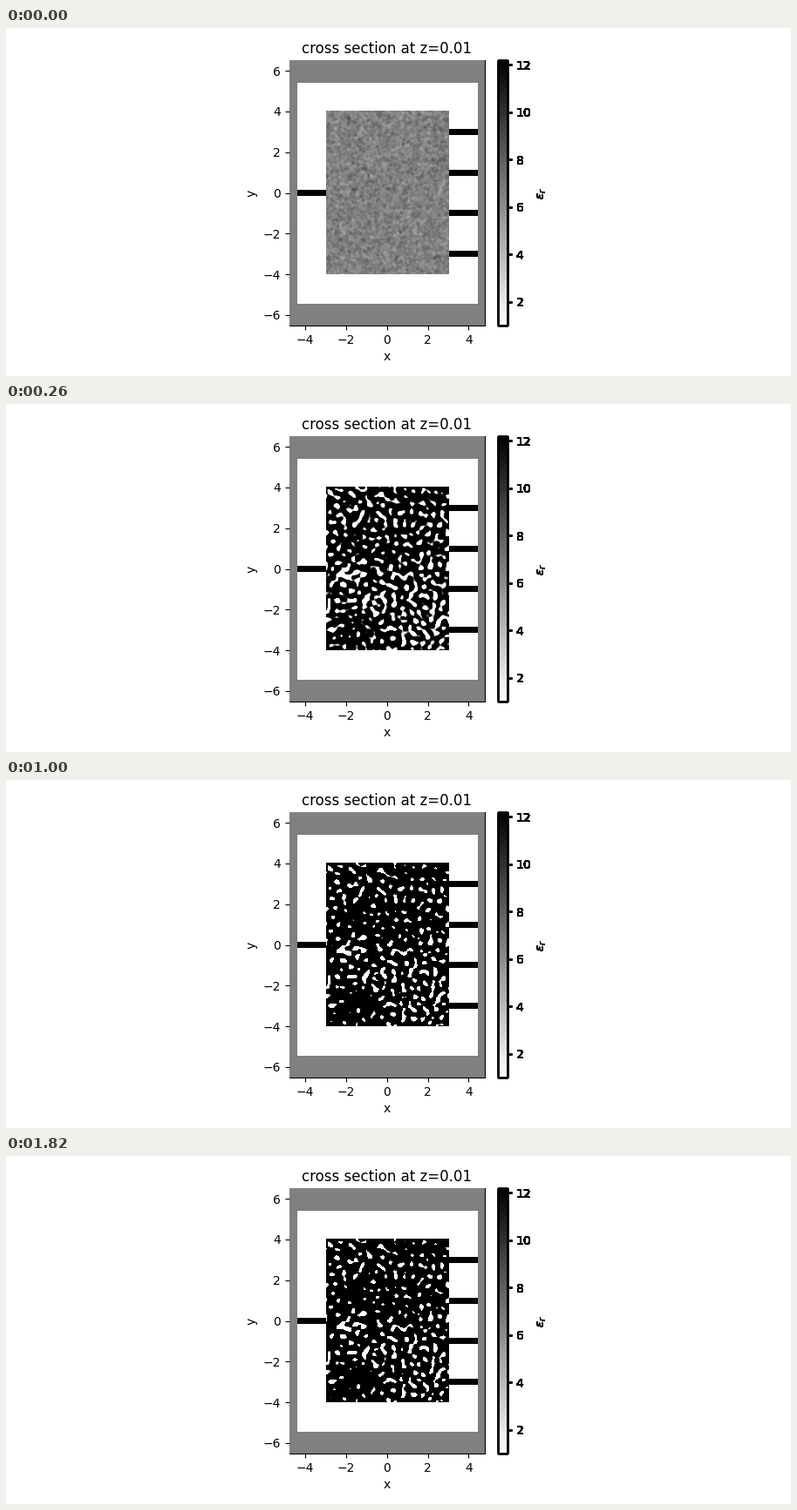
A matplotlib script that plays this animation: 900 px wide and 400 px high, repeating every 1840 ms.

```python
import matplotlib.pyplot as plt
import numpy as np
from matplotlib.animation import FuncAnimation
from matplotlib.patches import Rectangle

W, H, DPI = 900, 400, 100
TICKS, TICK_MS = 92, 20
NX, NY = 140, 187
EPS_MAX = 12.18
X_LIM, Y_LIM = 4.79, 6.511
BAR_COPIES = 40

rng = np.random.default_rng(7)
cols, rows = np.meshgrid(np.arange(NX), np.arange(NY))


def filtered(gain):
    """White noise shaped by a spectral gain, scaled to unit deviation."""
    fy = np.fft.fftfreq(NY)[:, None]
    fx = np.fft.fftfreq(NX)[None, :]
    spec = np.fft.fft2(rng.standard_normal((NY, NX))) * gain(fx, fy)
    out = np.fft.ifft2(spec).real
    return (out - out.mean()) / out.std()


def band(center, width):
    return lambda fx, fy: np.exp(-((np.hypot(fx, fy) - center) / width) ** 2)


def bump(x, y, rx, ry):
    return np.exp(-((cols - x) / rx) ** 2 - ((rows - y) / ry) ** 2)


grain = filtered(lambda fx, fy: np.exp(-(fx**2 + fy**2) * 24))
ripple = filtered(band(0.14, 0.03))
blobs = filtered(band(0.09, 0.045))

# more void along the middle and lower right, more solid elsewhere
trend = (1.5 * bump(22, 100, 18, 6) + 0.9 * bump(48, 131, 22, 8)
         + 0.5 * bump(115, 150, 30, 45) - 0.8 * bump(35, 168, 26, 16)
         - 0.4 * bump(50, 70, 50, 18) - 0.5 * bump(95, 5, 50, 10))


def density(step):
    start = 0.5 + 0.045 * grain
    late = 1 - np.exp(-max(step - 1, 0) / 3)
    void = (blobs + 0.9 * (1 - late) * ripple + trend
            - 0.15 - 0.85 * late - 0.002 * step)
    level = min(0.19 * step, 0.5)
    gain = 1.5 * 1.5 ** (min(step, 12) - 2)
    mix = min(step / 2, 1)
    return start * (1 - mix) + mix * (0.5 - level * np.tanh(gain * void))


def step_at(tick):
    """Three updates in every seven ticks, held for 1, 5 and 1 ticks."""
    cycle, phase = divmod(tick, 7)
    return 3 * cycle + (phase >= 1) + (phase >= 6)


def box(x, y, w, h):
    """Figure fractions from a pixel box with its origin at the top left."""
    return [x / W, 1 - (y + h) / H, w / W, h / H]


def overdraw(artist, copies):
    """Paint an artist several times so its soft edges build up."""
    paint = artist.draw

    def draw_copies(renderer):
        for _ in range(copies):
            paint(renderer)

    artist.draw = draw_copies


fig = plt.figure(figsize=(W / DPI, H / DPI), dpi=DPI)
ax = fig.add_axes(box(324.62, 37.2, 224.2, 304.7))
ax.set(xlabel="x", ylabel="y", title="cross section at z=0.01",
       facecolor="#808080")
ax.spines[["top", "left"]].set_visible(False)


def fill(x0, x1, y0, y1, color):
    ax.add_patch(Rectangle((x0, y0), x1 - x0, y1 - y0, color=color, lw=0))


fill(-4.4, 4.45, -5.44, 5.42, "white")
fill(-4.4, -3, -0.15, 0.15, "black")
for y in (-3, -1, 1, 3):
    fill(3, 4.45, y - 0.15, y + 0.15, "black")

fields = [1 + (EPS_MAX - 1) * density(s) for s in range(step_at(TICKS - 1) + 1)]
image = ax.imshow(fields[0], cmap="gray_r", vmin=1, vmax=EPS_MAX,
                  extent=(-3, 3, -4, 4), aspect="auto",
                  interpolation="nearest", zorder=2)
ax.set(xlim=(-X_LIM, X_LIM), ylim=(-Y_LIM, Y_LIM),
       xticks=range(-4, 5, 2), yticks=range(-6, 7, 2))

cax = fig.add_axes(box(563.8, 37.2, 11.2, 304.7))
bar = fig.colorbar(image, cax=cax, ticks=range(2, 13, 2))
bar.set_label(r"$\epsilon_r$")
fig.canvas.draw()
overdraw(bar.outline, BAR_COPIES)
overdraw(cax.yaxis.label, BAR_COPIES)
for mark in cax.yaxis.get_major_ticks():
    overdraw(mark.tick2line, BAR_COPIES)
    overdraw(mark.label2, BAR_COPIES)


def draw(tick):
    image.set_data(fields[step_at(tick)])
    return (image,)


anim = FuncAnimation(fig, draw, frames=TICKS, interval=TICK_MS, repeat=True,
                     repeat_delay=0, blit=True)
plt.show()
```
